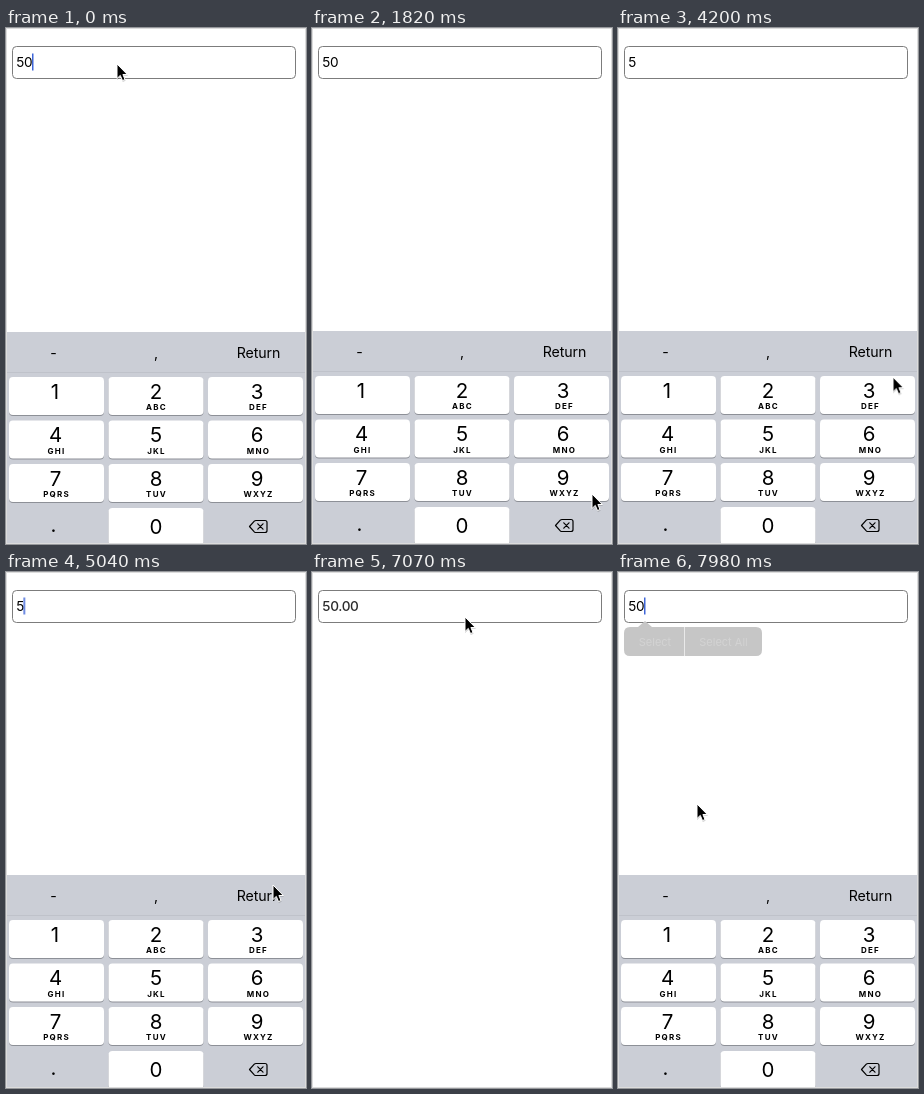
Write an HTML page that moves like this. It is 300x516 px and loops after 8 s.

```html
<!DOCTYPE html>
<html lang="en">
<head>
<meta charset="utf-8">
<title>Number field with keypad</title>
<style>
  html, body { margin: 0; width: 100%; height: 100%; overflow: hidden; background: #fff; }
  svg { display: block; width: 300px; height: 516px; font-family: Inter, Roboto, sans-serif; fill: #000; }
  svg * { animation-duration: 8s; animation-iteration-count: infinite; animation-timing-function: linear; }

  .value { font-size: 13.6px; letter-spacing: -.33px; animation-timing-function: step-end; }
  .blurred { font-weight: 500; fill: #2c2c2c; }
  .mid { text-anchor: middle; }
  .bar { font-size: 14.2px; letter-spacing: -.1px; }
  .digit { font-size: 20.5px; }
  .letters { font-size: 8px; font-weight: 700; letter-spacing: 1.2px; }
  .menu text { font-size: 11px; fill: #d3d3d3; }

  .full { animation-name: full; }
  .short { animation-name: short; }
  .blurred { animation-name: blurred; }
  .caret { animation-name: blink, shift; animation-timing-function: linear, step-end; }
  .keypad { animation-name: slide; }
  .pressed { animation-name: press; animation-timing-function: step-end; }
  .menu { animation-name: menu; }
  .pointer { animation-name: point; animation-timing-function: ease-in-out; }

  @keyframes full { 0%, 91% { opacity: 1 } 42.875% { opacity: 0 } 100% { opacity: 1 } }
  @keyframes short { 0%, 65.625%, 100% { opacity: 0 } 42.875% { opacity: 1 } }
  @keyframes blurred { 0%, 91%, 100% { opacity: 0 } 65.625% { opacity: 1 } }
  @keyframes press { 0%, 45.5%, 100% { opacity: 0 } 42.875% { opacity: 1 } }
  @keyframes shift {
    0%, 65.625%, 100% { transform: none }
    42.875% { transform: translateX(-8.5px) }
  }
  @keyframes blink {
    0%, 4.375% { opacity: 1 }
    7.875%, 11.375% { opacity: 0 }
    14.875%, 19.25% { opacity: 1 }
    22.75%, 26.25% { opacity: 0 }
    29.75%, 34.125% { opacity: 1 }
    37.625%, 41.125% { opacity: 0 }
    42.874% { opacity: .5 }
    42.875%, 49% { opacity: 1 }
    52.5%, 56% { opacity: 0 }
    59.5%, 65.624% { opacity: 1 }
    65.625%, 90.999% { opacity: 0 }
    91%, 100% { opacity: 1 }
  }
  /* critically damped spring, 500 ms each way */
  @keyframes slide {
    0% { transform: translateY(1px); animation-timing-function: step-end }
    .875% { transform: none }
    65.625% {
      transform: none;
      animation-timing-function: linear(0, .232, .545, .758, .879, .942, .973, .988, .994, .998, 1);
    }
    71.875% { transform: translateY(213px) }
    91% {
      transform: translateY(213px);
      animation-timing-function: linear(0, .232, .545, .758, .879, .942, .973, .988, .994, .998, 1);
    }
    97.25%, 100% { transform: none }
  }
  @keyframes menu { 0%, 98% { opacity: 0 } 99.75%, 100% { opacity: 1 } }
  @keyframes point {
    0%, .875% { transform: translate(111px, 36px) }
    22.75%, 35.875% { transform: translate(280px, 466px) }
    41.125%, 47.25% { transform: translate(265px, 501px) }
    55.125%, 56% { transform: translate(278px, 304px) }
    63% { transform: translate(267px, 313px) }
    69.125% { transform: translate(267px, 313px); animation-timing-function: ease-in }
    75.25% { transform: translate(172px, 70px); animation-timing-function: ease-out }
    79.625%, 87.5% { transform: translate(153px, 49px) }
    88.375% { transform: translate(153px, 45px) }
    91%, 91.875% { transform: translate(140px, 22px) }
    99.75%, 100% { transform: translate(79px, 232px) }
  }
</style>
</head>
<body>
<svg viewBox="0 0 300 516">
  <defs>
    <clipPath id="screen"><path d="M1 1H299V515H1Z"/></clipPath>
    <g id="key">
      <rect y="1" width="95" height="38" rx="4" fill="#8d9097"/>
      <rect width="95" height="38" rx="4" fill="#fff"/>
    </g>
    <path id="erase" d="M243.5 497.5 248.3 492.2Q249 491.5 250 491.5H259Q261 491.5 261 493.5V501.5Q261 503.5 259 503.5H250Q249 503.5 248.3 502.8Z"/>
    <path id="cross" d="M251.8 494.8 257 500.2M257 494.8 251.8 500.2"/>
  </defs>

  <rect x="6.5" y="18.5" width="283" height="32" rx="4" fill="#fff" stroke="#7c7c7c"/>
  <text class="value full" x="10.3" y="39">50</text>
  <text class="value short" x="10.3" y="39">5</text>
  <text class="value blurred" x="10.3" y="39">50.00</text>
  <rect class="caret" x="26" y="25.5" width="1.5" height="17" fill="#3f66d8"/>

  <g class="menu">
    <path fill="#c6c6c6" d="M12 55H20L27 49 34 55H138Q144 55 144 61V78Q144 84 138 84H12Q6 84 6 78V61Q6 55 12 55Z"/>
    <path stroke="#e9e9e9" d="M66.5 55V84"/>
    <text class="mid" x="37" y="74">Select</text>
    <text class="mid" x="105.500" y="74">Select All</text>
  </g>

  <g clip-path="url(#screen)">
    <g class="keypad">
      <path fill="#cbced6" d="M0 303H300V516H0Z"/>
      <path stroke="#bfc2ca" d="M0 343.5H300"/>
      <g class="mid bar">
        <text x="47.500" y="329">-</text>
        <text x="150" y="329">,</text>
        <text x="252.500" y="329">Return</text>
      </g>

      <use href="#key" x="3" y="348"/><use href="#key" x="102.500" y="348"/><use href="#key" x="202" y="348"/>
      <use href="#key" x="3" y="391.500"/><use href="#key" x="102.500" y="391.500"/><use href="#key" x="202" y="391.500"/>
      <use href="#key" x="3" y="435"/><use href="#key" x="102.500" y="435"/><use href="#key" x="202" y="435"/>
      <use href="#key" x="102.500" y="479"/>

      <g class="mid digit">
        <text x="49" y="369.500">1</text><text x="150" y="369.500">2</text><text x="251" y="369.500">3</text>
        <text x="49.500" y="413">4</text><text x="150" y="413">5</text><text x="251" y="413">6</text>
        <text x="49.500" y="456.500">7</text><text x="150" y="456.500">8</text><text x="251" y="456.500">9</text>
        <text x="47.500" y="502.500">.</text><text x="150" y="504.500">0</text>
      </g>
      <g class="mid letters">
        <text x="150.500" y="381">ABC</text><text x="252.500" y="381">DEF</text>
        <text x="50.500" y="424.500">GHI</text><text x="150.500" y="424.500">JKL</text><text x="252.500" y="424.500">MNO</text>
        <text x="50.500" y="468">PQRS</text><text x="150.500" y="468">TUV</text><text x="252.500" y="468">WXYZ</text>
      </g>

      <g fill="none" stroke="#000" stroke-width="1.2" stroke-linecap="round" stroke-linejoin="round">
        <use href="#erase"/><use href="#cross"/>
        <g class="pressed"><use href="#erase" fill="#000"/><use href="#cross" stroke="#fff"/></g>
      </g>
    </g>
  </g>

  <rect x=".5" y=".5" width="299" height="515" fill="none" stroke="#dcdcdc"/>

  <g class="pointer">
    <path d="M0 1V16L3.500 12.700 5.800 18 8.600 16.800 6.400 11.800H11Z" opacity=".2"/>
    <path d="M0 0V14.500L3.300 11.400 5.500 16.600 8 15.500 5.900 10.500H10.300Z" stroke="#fff" stroke-width="1" stroke-linejoin="round"/>
  </g>
</svg>
</body>
</html>
```
